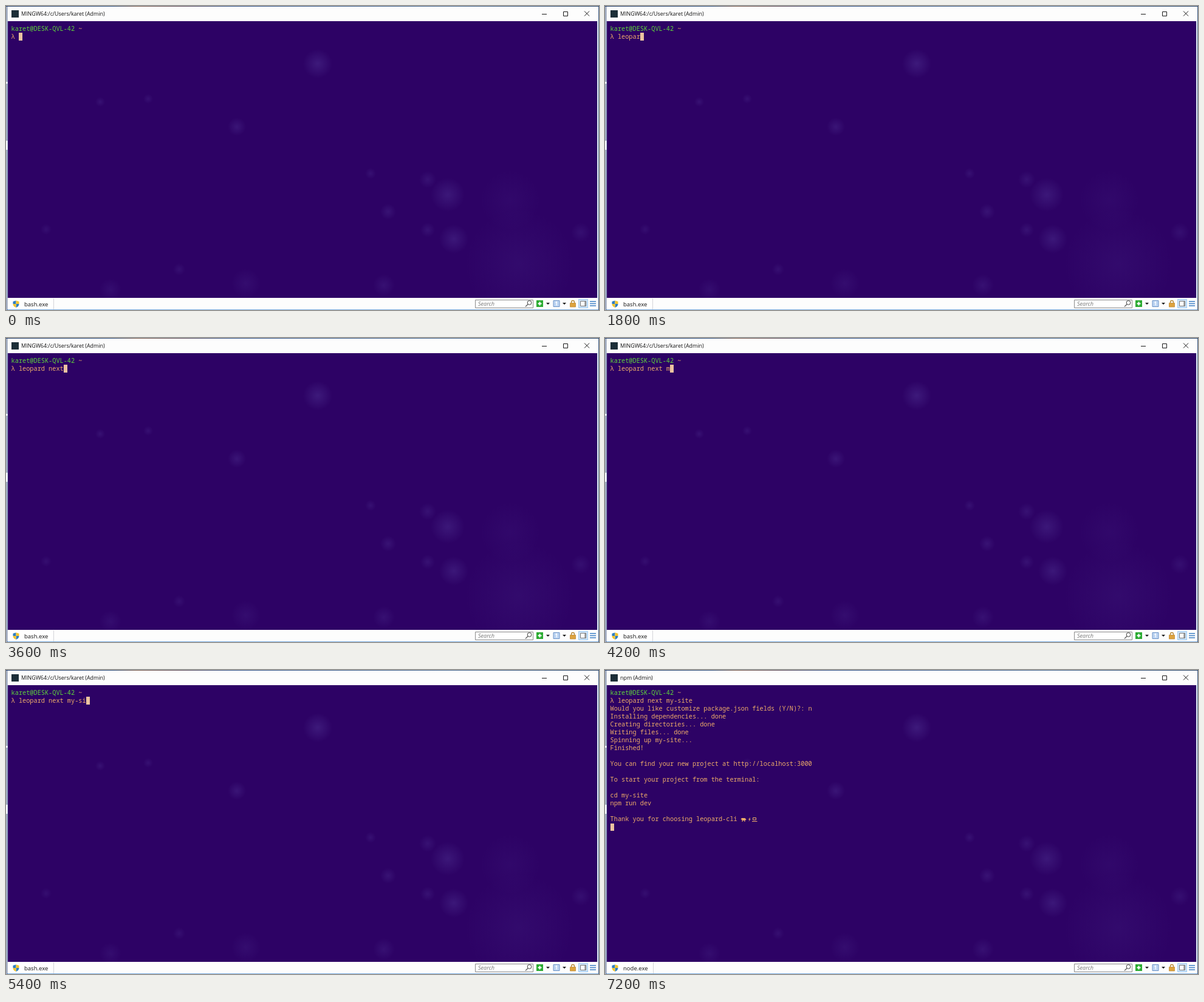
Animation of 976 by 501 pixels, one loop 7500 ms. Source, as an HTML page:

```html
<!DOCTYPE html>
<html lang="en">
<head>
<meta charset="utf-8">
<title>Terminal session</title>
<style>
  html, body { margin: 0; width: 100%; height: 100%; overflow: hidden; background: #fff; }
  #stage { position: relative; width: 976px; height: 501px; overflow: hidden; background: #fdfdfd;
    font-family: "Open Sans", "Noto Sans", sans-serif; color: #111; }
  #stage > * { position: absolute; }
  .label { white-space: pre; line-height: 14px; }
  #title { left: 25px; top: 6px; font-size: 8.9px; }
  #tab { left: 4px; top: 482px; width: 74px; height: 18px; background: #fff; border-right: 1px solid #d4d4d8; }
  #task { left: 30px; top: 485px; font-size: 9.5px; }
  #hint { left: 777px; top: 484px; font-size: 9.1px; font-style: italic; color: #777; }
  #screen { left: 3px; top: 25px; width: 970px; height: 456px; background-color: #2d0265; }
  #term { left: 0; top: 0; font: 10.25px/13px "Noto Sans Mono", "DejaVu Sans Mono", monospace; color: #eeac69; }
  #term div { position: absolute; left: 8.6px; white-space: pre; }
  #term b { font-weight: 400; color: #5fd43c; }
  #cursor { width: 6px; height: 12.5px; background: #ecc3a0; }
  #chrome, #emoji { left: 0; top: 0; }
</style>
</head>
<body>
<div id="stage">
  <div id="screen"></div>
  <div id="tab"></div>
  <svg id="chrome" width="976" height="501" fill="none">
    <defs>
      <linearGradient id="desk">
        <stop offset="0" stop-color="#26406b"/>
        <stop offset=".18" stop-color="#31527f"/>
        <stop offset=".22" stop-color="#7a5a4c"/>
        <stop offset=".3" stop-color="#5c4a5a"/>
        <stop offset=".38" stop-color="#33548a"/>
        <stop offset=".75" stop-color="#47688f"/>
        <stop offset="1" stop-color="#274468"/>
      </linearGradient>
    </defs>
    <path fill="url(#desk)" d="M0 0h976v1H0z"/>
    <path fill="#29406f" d="M1 1h1v500h-1z"/>
    <path fill="#d6e4f4" d="M2 25h1v456h-1zM973 25h1v456h-1z"/>
    <path fill="#3d5c85" d="M975 1h1v500h-1z"/>
    <path fill="#e8f0fa" d="M1 125h1v3h-1zM1 222h1v15h-1z"/>
    <path fill="#79ace0" d="M2 500h973v1H2z"/>

    <path fill="#1c2e38" d="M9 7h12v12H9z"/>
    <g stroke="#1a1a1a">
      <path d="M882 13.5h8M952 8.5l8 8M960 8.5l-8 8"/>
      <path d="M917.5 9.5h7v7h-7z"/>
    </g>

    <path fill="#2f7fc4" d="M16.5 485.5L11.5 487v4h5zM16.5 491h5c0 3-2 5-5 6z"/>
    <path fill="#f2c52f" d="M16.5 485.5l5 1.5v4h-5zM11.5 491h5v6c-3-1-5-3-5-6z"/>

    <path fill="#fff" stroke="#8b8b8b" d="M772.5 484.5h95v13h-95z"/>
    <g stroke="#555" stroke-width="1.1">
      <circle cx="861.5" cy="489" r="3.2"/>
      <path d="M859 491.5l-4 4"/>
    </g>
    <path fill="#2bab32" d="M873 485h11v11h-11z"/>
    <path stroke="#fff" stroke-width="2" d="M875.5 490.5h6M878.5 487.5v6"/>
    <path fill="#222" d="M889 489h6l-3 3.2zM916 489h6l-3 3.2z"/>
    <path fill="#bcd4f2" stroke="#6c93c6" d="M901 485.5h10v10h-10z"/>
    <path stroke="#fff" stroke-width="1.3" d="M904.5 488.5l1.7-1v6"/>
    <path stroke="#b88a35" stroke-width="1.3" d="M930.5 490v-2a2.5 2.5 0 0 1 5 0v2"/>
    <path fill="#dda33e" stroke="#b98228" stroke-width=".7" d="M928.5 489.5h9v6.5h-9z"/>
    <path fill="#cfe5fa" stroke="#9fcaf0" d="M942.5 483.5h15v14h-15z"/>
    <path fill="#fff" stroke="#777" d="M945.5 486.5h9v8h-9z"/>
    <path fill="#aaa" d="M952 487h2v7h-2z"/>
    <path stroke="#3d7fc5" stroke-width="1.5" d="M961 487h10M961 490.5h10M961 494h10"/>
  </svg>
  <div id="title" class="label"></div>
  <div id="task" class="label"></div>
  <div id="hint" class="label">Search</div>
  <div id="term"></div>
  <svg id="emoji" width="976" height="501" fill="#eeac69">
    <path d="M223.5 246l1.5-2h5l1.5 1 1 2-2 .5v2.5h-1.2v-2h-2.6v2h-1.2v-3z"/>
    <path d="M239 242.5l-3 4h1.7l-1.2 3.5 3.3-4.5h-1.7z"/>
    <path fill="none" stroke="#eeac69" d="M243.5 243.5h5v3.5h-5zM242 249.5h8.5"/>
  </svg>
  <div id="cursor"></div>
</div>
<script>
const STEP = 300, STEPS = 25;
const LEFT = 8.6, TOP = 30.5, LINE = 13.05, CHAR = 6.15;
const command = "leopard next my-site";
const question = "Would you like customize package.json fields (Y/N)?: ";
const report = [
  "Installing dependencies... done",
  "Creating directories... done",
  "Writing files... done",
  "Spinning up my-site...",
  "Finished!",
  "",
  "You can find your new project at http://localhost:3000",
  "",
  "To start your project from the terminal:",
  "",
  "cd my-site",
  "npm run dev",
  "",
  "Thank you for choosing leopard-cli ",
  ""
];
const $ = id => document.getElementById(id);

// Faint nebula glows: x, y, radius, strength in percent
const glows = [
  [513, 95, 24, 20], [727, 311, 28, 18], [737, 384, 24, 18],
  [629, 339, 13, 14], [380, 199, 15, 16], [694, 286, 14, 13],
  [694, 369, 12, 13], [155, 158, 8, 13], [234, 153, 8, 12],
  [600, 276, 9, 12], [66, 368, 9, 10], [285, 434, 10, 11],
  [622, 460, 18, 12], [395, 457, 24, 9], [172, 467, 18, 9],
  [946, 373, 16, 11], [845, 425, 90, 7], [830, 320, 50, 5]
];
$("screen").style.backgroundImage = glows.map(([x, y, r, a]) =>
  `radial-gradient(circle at ${x - 3}px ${y - 25}px, rgba(125,120,210,${a / 100}), rgba(90,70,170,0) ${r}px)`
).join(",");

function linesAt(step) {
  const lines = ["λ " + command.slice(0, step)];
  if (step >= 21) lines.push(question + (step > 21 ? "n" : ""));
  if (step === 23) lines.push("Installing dependencies... ");
  if (step === 24) lines.push(...report);
  return lines;
}

function addLine(text, row) {
  const line = document.createElement("div");
  line.textContent = text;
  line.style.top = TOP + row * LINE + "px";
  $("term").append(line);
  return line;
}

function render(step) {
  const lines = linesAt(step);
  $("term").replaceChildren();
  addLine("", 0).innerHTML = "<b>karet@DESK-QVL-42</b> ~";
  lines.forEach((text, i) => addLine(text, i + 1));
  const last = lines[lines.length - 1];
  $("cursor").style.left = LEFT + last.length * CHAR + "px";
  $("cursor").style.top = TOP + lines.length * LINE + "px";
  $("cursor").style.marginTop = "0.5px";
  $("title").textContent = step < 23 ? "MINGW64:/c/Users/karet (Admin)" : "npm (Admin)";
  $("task").textContent = step < 21 ? "bash.exe" : "node.exe";
  $("tab").style.width = (step < 21 ? 74 : 75) + "px";
  $("emoji").style.visibility = step === 24 ? "visible" : "hidden";
}

const start = performance.now();
let shown = -1;
function tick() {
  const step = Math.floor((performance.now() - start) / STEP) % STEPS;
  if (step !== shown) render(shown = step);
  requestAnimationFrame(tick);
}
tick();
</script>
</body>
</html>
```
